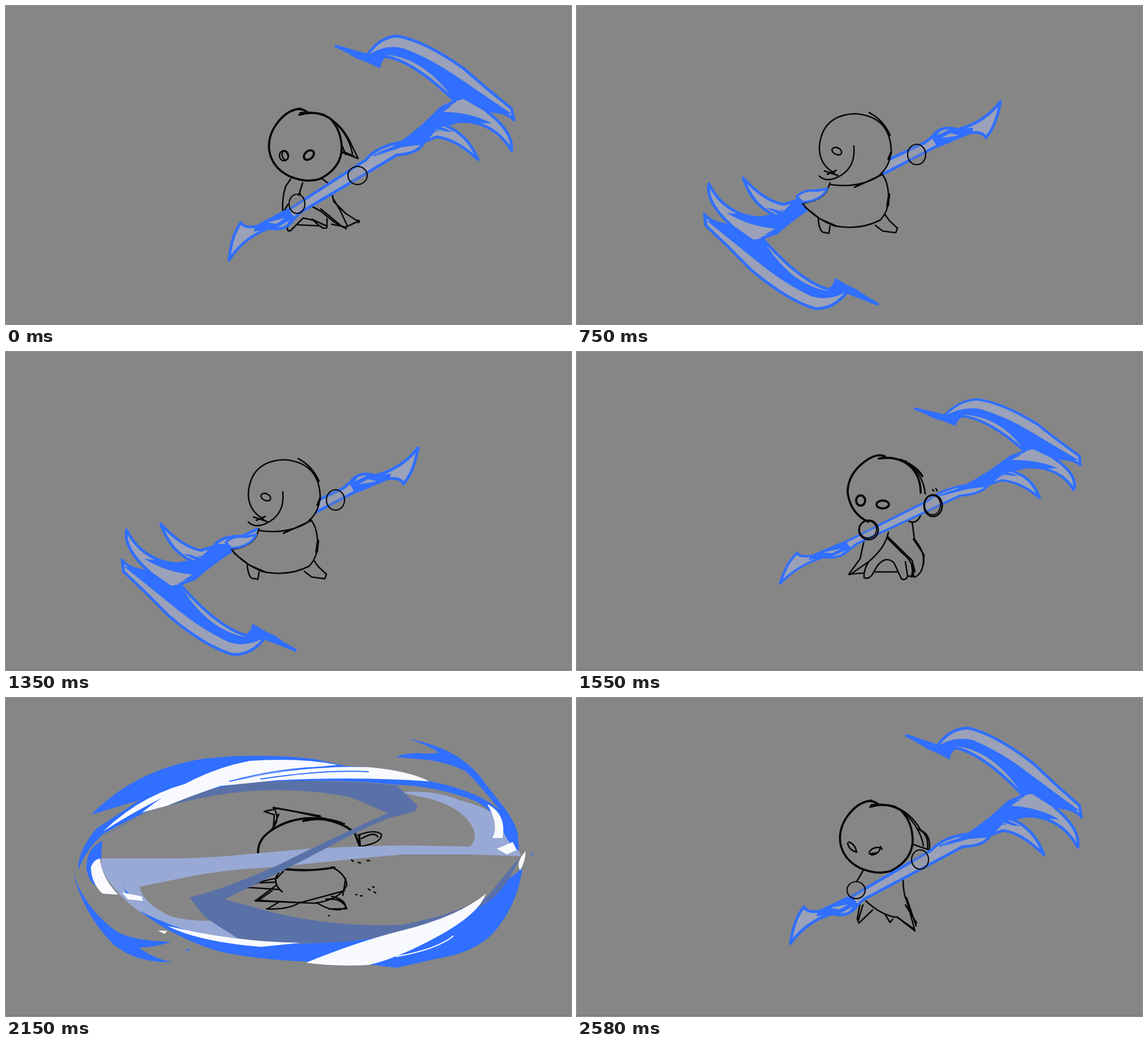
An HTML page with a canvas that plays this animation: 998x561 px, repeating every 2.78 s.

```html
<!DOCTYPE html>
<html lang="en">
<head>
<meta charset="utf-8">
<title>Scythe spin</title>
<style>
html, body { margin: 0; width: 100%; height: 100%; overflow: hidden; background: #868686; }
canvas { display: block; }
</style>
</head>
<body>
<canvas id="stage" width="998" height="561"></canvas>
<script>
const ctx = document.getElementById('stage').getContext('2d');
const GREY = '#868686', BLUE = '#306fff', STEEL = '#9aa1b8', INK = '#080808';
const LIGHT = '#99a9d5', DARK = '#5a71a8', WHITE = '#f9faff';
ctx.lineJoin = ctx.lineCap = 'round';

const fill = (d, color) => { ctx.fillStyle = color; ctx.fill(new Path2D(d)); };
const line = (d, width, color = INK) => {
  ctx.strokeStyle = color;
  ctx.lineWidth = width;
  ctx.stroke(new Path2D(d));
};
const oval = (x, y, rx, ry, deg = 0) => {
  const a = deg * Math.PI / 180, dx = rx * Math.cos(a), dy = rx * Math.sin(a);
  const arc = `a${rx} ${ry} ${deg} 1 0 `;
  return `M${x - dx} ${y - dy}${arc}${2 * dx} ${2 * dy}${arc}${-2 * dx} ${-2 * dy}`;
};

// Scythe, drawn once and placed by its tail, hook and blade tips
const SCYTHE = {
  outline: 'M583 71L638 87Q660 54 692 53Q740 62 808 110Q850 147 893 181L897 201Q885 186 848 185Q897 222 893 255Q862 203 800 203L775 211Q814 224 834 271Q794 234 760 231L738 240Q730 260 690 263L640 293L520 364L508 376Q495 398 465 392Q420 408 394 448Q398 405 415 382Q422 396 455 385Q475 370 500 359L635 272Q655 247 700 240Q735 215 768 180L793 168Q722 99 672 89Q655 92 660 107Z',
  solid: 'M583 71L638 90L664 97L660 107L620 93ZM636 90Q665 67 700 74Q750 92 800 127L893 190L848 187L808 164L793 168Q740 92 672 86L660 106ZM768 180L790 174L772 187Q820 187 858 207L800 206L768 213L790 222L758 221L738 244L700 249L655 264L700 238Q735 215 768 180ZM440 388Q470 370 500 360L510 374Q495 398 465 393L438 398Z',
  shine: 'M756 217Q796 222 814 249Q788 228 756 217ZM658 263Q690 250 726 250Q718 258 690 258ZM461 382L493 374L478 384ZM479 391L501 378L492 391Z'
};
const BASE = [393, 449, 583, 71, 897, 200];

function placeScythe(to) {
  const span = p => [p[2] - p[0], p[3] - p[1], p[4] - p[0], p[5] - p[1]];
  const [ux, uy, vx, vy] = span(BASE), [px, py, qx, qy] = span(to);
  const det = ux * vy - vx * uy;
  const a = (px * vy - qx * uy) / det, c = (qx * ux - px * vx) / det;
  const b = (py * vy - qy * uy) / det, d = (qy * ux - py * vx) / det;
  ctx.save();
  ctx.transform(a, b, c, d, to[0] - a * BASE[0] - c * BASE[1], to[1] - b * BASE[0] - d * BASE[1]);
  fill(SCYTHE.outline, STEEL);
  fill(SCYTHE.solid, BLUE);
  fill(SCYTHE.shine, STEEL);
  line(SCYTHE.outline, 5, BLUE);
  line('M650 264Q690 242 735 244', 3, BLUE);
  ctx.restore();
}

const head = right => `M520 181Q496 183 478 208Q462 230 465 255Q470 285 500 300Q530 313 555 305Q${right} 285 ${right} 250Q${right - 1} 218 572 198Q552 185 520 189M505 185Q519 178 532 187M518 192Q540 185 562 192`;
const HOOD = 'M557 190Q588 203 606 236L622 269L593 258M568 195Q605 222 612 261M594 247L600 262M596 257L615 265';
const LEGS = 'M497 390Q496 399 503 396L525 374L543 378Q560 396 567 391L567 375M516 386L556 388M540 376L566 388';
const CAPE = 'M556 303L572 315L579 345L600 366L622 380L600 390L575 385M578 340L590 360L603 388M530 348L556 362L578 380L601 393M556 358L590 386M622 378a2 2 0 1 1 0 4';

const CALM = {
  bold: head(593) + oval(535, 263, 10, 7, -40),
  thin: HOOD + LEGS + CAPE + oval(491, 264, 8, 9) + oval(493, 264, 5, 8, -20) +
    'M503 305L494 318Q487 340 489 365L498 350M524 312L517 334L520 331'
};
const ANGRY = {
  bold: head(588) + 'M481 252Q492 255 497 268Q490 273 486 272Q479 265 481 252M515 271Q520 257 542 258Q535 270 515 271',
  thin: LEGS + CAPE + oval(489, 263, 4, 7, -20) + oval(528, 265, 4, 6, 30) +
    'M557 190Q586 203 603 236L619 269L588 258M568 195Q602 222 608 261M590 247L596 262M502 306L490 324Q486 345 489 361L474 393M519 312L516 330M520 340L560 376M498 362L483 390L466 392M492 365L481 388L500 388'
};
const BACK = {
  mask: 'M428 255Q430 190 492 190Q553 195 555 255Q553 280 537 295Q552 310 550 345Q548 370 520 387Q480 396 455 388Q418 372 398 348Q435 343 447 312L428 300L455 294Q430 280 428 255',
  bold: 'M555 258L550 270M548 353L551 333',
  thin: 'M455 295Q428 280 428 250Q432 192 492 190Q553 195 555 255Q553 285 530 302Q495 322 447 315M516 188Q541 201 553 228M489 247Q493 288 458 303Q440 311 428 300M437 291L461 299M442 297L458 290M490 320L540 297M447 312L442 325Q432 344 398 348Q420 375 455 388Q500 396 535 378Q553 360 550 330Q548 305 537 295M403 355L430 376L460 389M426 376Q428 395 434 399L445 401L447 388M544 368L552 379L566 392L563 400L540 397L527 387M550 352L552 332' + oval(459, 256, 9, 6, 25),
  grip: 'M388 336Q400 323 425 326L442 322Q432 344 398 346Z'
};
const READY = {
  bold: 'M544 184Q530 178 510 192Q478 215 478 248Q483 285 515 300M533 188Q570 182 592 205Q607 222 607 248M572 190Q600 202 610 219M592 376L594 394' + oval(501, 262, 8, 9) + oval(540, 269, 11, 7),
  thin: 'M580 192Q612 215 615 250M585 298Q600 306 608 286M592 300L596 330Q612 350 612 365Q612 390 597 397L585 395M508 328L500 365L480 392L505 390M550 318Q545 345 515 370L482 393M548 328L575 355Q600 375 590 397M548 325L592 368L597 388M515 370Q506 385 507 398Q515 402 522 392L530 378Q545 358 560 372L573 400Q580 404 584 396L580 370M527 388L565 388M594 330L613 358L612 375M628 243l2 2M634 241l2 4'
};
const LAND = {
  bold: head(593),
  thin: 'M557 190Q590 202 607 233Q626 242 622 268L593 258M568 195Q605 222 612 261M602 231Q622 240 619 265M478 256Q480 268 494 272Q491 257 480 254M516 272Q522 262 536 264Q533 276 520 277M536 262l3 5M516 275L530 273M505 305L494 324M500 362L495 390L498 397L522 374M505 365L497 392M510 358Q540 385 566 387L597 411L583 360Q576 345 576 320M565 386L596 408M599 402L582 352M545 383L553 396L558 390M580 365L600 397'
};

function figure({ mask, bold, thin }) {
  if (mask) fill(mask, GREY);
  line(thin, 2.6);
  line(bold, 3.8);
}

// Each hand is [x, y, rx, ry]; heavy ones get a second sketched ring
function hands(list, width) {
  for (const [x, y, rx, ry] of list) {
    fill(oval(x, y, rx, ry), 'rgba(134,134,134,.25)');
    line(oval(x, y, rx, ry), width);
    if (width > 2.5) line(oval(x - 1, y - 1, rx - 2, ry - 2), 2);
  }
}

const pose = (who, scythe, grips, width = 2.2) => () => {
  const behind = who === BACK;
  if (!behind) figure(who);
  placeScythe(scythe);
  hands(grips, width);
  if (behind) {
    figure(who);
    fill(who.grip, STEEL);
    line(who.grip, 4, BLUE);
  }
};
const shift = (p, dx, dy) => p.map((v, i) => v + (i % 2 ? dy : dx));

const DANCER = {
  bold: 'M446 280Q441 252 468 234Q500 212 540 212Q588 214 616 238L625 262M624 242L625 260M525 217Q560 209 592 220M480 300Q530 308 580 299',
  thin: 'M472 230L474 206L456 200L480 195Q540 205 598 222M466 235Q488 215 472 193L555 208M470 232L482 205M622 242Q650 231 663 240Q665 256 625 262M628 248Q650 235 657 245M478 318Q440 325 425 334L484 338M450 326L475 325M482 308Q468 325 488 342M490 306L478 318M575 298Q600 310 602 330Q590 356 545 362L440 358L478 330M470 340L446 357L520 361L598 340M600 318L595 348M550 362Q580 380 600 370Q600 355 575 350M565 355Q595 352 602 372L570 372M460 372Q500 374 520 360M482 360L462 372M610 285l3 3M622 290l4 1M638 287l4 0M640 337l3 2M648 333l2 1M650 342l3 2M618 347l2 0M626 349l3 0M570 384l1 0'
};

function swirl() {
  fill('M168 283L290 283Q340 283 400 278L520 267Q600 262 700 260L820 262Q832 248 826 232Q810 195 750 178L695 166Q760 162 800 180Q860 195 880 220L900 258L910 279L820 276L700 276Q600 285 480 298Q380 302 300 320L236 333Q240 360 290 385Q330 395 372 393L412 412L410 430L360 427Q300 415 240 380Q190 345 168 300Z', LIGHT);
  fill('M150 206Q230 125 350 107Q450 96 548 108L600 120Q680 122 750 147Q840 165 880 205Q908 240 906 270Q892 262 880 240Q870 205 830 182Q760 155 690 153Q560 140 440 150Q300 165 172 240Q140 268 128 303Q125 272 160 230L236 180ZM709 72Q760 80 800 105Q830 125 850 155L885 200Q905 230 905 250L870 195Q830 145 810 128Q770 110 730 108L688 104Q710 95 740 98L765 97Q745 82 709 72', BLUE);
  fill('M170 252Q142 265 142 300Q146 328 165 335L152 305Q152 285 168 284ZM205 322Q210 348 236 357L215 353ZM118 305Q135 365 190 408Q215 428 292 430Q265 440 235 440Q260 460 295 466Q230 468 190 435Q135 380 118 305M235 375Q320 418 400 428L520 433Q600 432 690 418Q800 395 850 350L912 300Q905 360 865 410Q830 450 760 460L690 476L640 470L530 465Q450 462 380 448Q300 425 235 375', BLUE);
  fill('M170 246Q280 170 430 148Q560 142 690 154L727 190L722 200L675 212Q620 235 560 268Q480 310 386 355L470 378Q580 405 700 400Q800 380 850 350L908 280Q880 350 830 372Q760 412 600 430Q500 436 410 424Q370 400 350 385L324 352Q400 332 480 295Q580 245 675 203L608 175Q520 157 420 165Q330 175 245 202Z', DARK);
  fill('M240 202Q330 130 430 111Q520 105 586 118Q500 125 420 142Q345 165 285 190ZM370 156Q500 118 640 122Q710 128 748 147Q620 138 480 145ZM172 235Q245 165 340 146Q250 185 172 235M150 298Q155 285 166 283Q168 315 198 347L170 345Q150 325 150 298M205 343L240 350L242 358L215 355ZM850 187Q885 205 877 247L859 247Q872 225 850 187M867 266L895 254L902 268L885 276ZM918 270Q917 290 908 304Q900 290 918 270', WHITE);
  fill('M285 402Q400 430 520 432L450 439Q340 430 285 402M530 467Q620 430 700 410Q800 385 848 345Q835 382 760 422Q690 460 640 471Q580 474 530 467M268 410L285 411L280 416Z', WHITE);
  line('M395 147Q490 122 570 122M450 143Q560 126 640 130', 2, BLUE);
  line('M690 456Q760 444 790 420', 2, WHITE);
  line('M866 181L880 194M929 273l1 4M318 446l6 -3', 2, BLUE);
}

const spin = turned => () => {
  ctx.save();
  if (turned) ctx.transform(-1, 0, 0, 1, 1050, 0);
  figure(DANCER);
  ctx.restore();
  ctx.save();
  if (turned) ctx.transform(-1, 0, 0, -1, 1028, 566);
  swirl();
  ctx.restore();
};

function slash() {
  fill('M880 120Q700 35 450 48Q150 80 78 260Q72 400 300 485Q420 535 530 526Q330 470 250 380Q190 290 310 190Q520 100 880 120', BLUE);
  fill('M700 90Q420 60 230 165Q110 260 190 370Q250 440 360 485Q220 390 210 300Q220 130 700 90', WHITE);
  figure(BACK);
}

const HIGH = BASE;
const LOW = [749, 168, 531, 526, 225, 368];
const FLAT = [358, 409, 597, 100, 889, 199];
const WOUND = [405, 493, 500, 80, 826, 129];
const END = [376, 434, 582, 66, 891, 209];
const LOW_HAND = [[600, 262, 16, 18]];
const END_HANDS = [[493, 339, 16, 15], [606, 285, 15, 17]];

const TIMELINE = [
  [0, pose(CALM, HIGH, [[514, 349, 14, 17], [621, 299, 17, 16]])],
  [500, pose(ANGRY, [353, 394, 638, 83, 907, 294], [[506, 340, 13, 18], [615, 300, 19, 21]], 2.6)],
  [650, slash],
  [750, pose(BACK, LOW, LOW_HAND)],
  [900, pose(BACK, shift(LOW, 0, -14), [[600, 250, 16, 18]])],
  [1050, pose(BACK, LOW, LOW_HAND)],
  [1350, pose(BACK, shift(LOW, -20, 0), [[582, 261, 16, 18]])],
  [1450, pose(READY, [385, 430, 580, 54, 884, 186], [[507, 331, 17, 17], [613, 282, 16, 18]], 3)],
  [1550, pose(READY, FLAT, [[515, 314, 17, 17], [629, 271, 16, 19]], 3)],
  [1700, pose(READY, HIGH, [[506, 356, 17, 17], [615, 298, 16, 18]], 3)],
  [1800, pose(READY, WOUND, [[496, 365, 17, 17], [586, 289, 16, 18]], 3)],
  [2000, pose(READY, shift(WOUND, -8, -2), [[488, 363, 17, 17], [578, 287, 16, 18]], 3)],
  [2150, spin(false)],
  [2220, spin(true)],
  [2290, spin(false)],
  [2360, spin(true)],
  [2430, pose(LAND, shift(END, -18, -18), END_HANDS.map(([x, y, ...size]) => [x - 14, y - 14, ...size]))],
  [2580, pose(LAND, END, END_HANDS)]
];

function render() {
  const t = performance.now() % 2780;
  ctx.fillStyle = GREY;
  ctx.fillRect(0, 0, 998, 561);
  TIMELINE.findLast(([start]) => start <= t)[1]();
  ctx.fillStyle = '#787878';
  ctx.fillRect(0, 560, 998, 1);
  requestAnimationFrame(render);
}
render();
</script>
</body>
</html>
```
